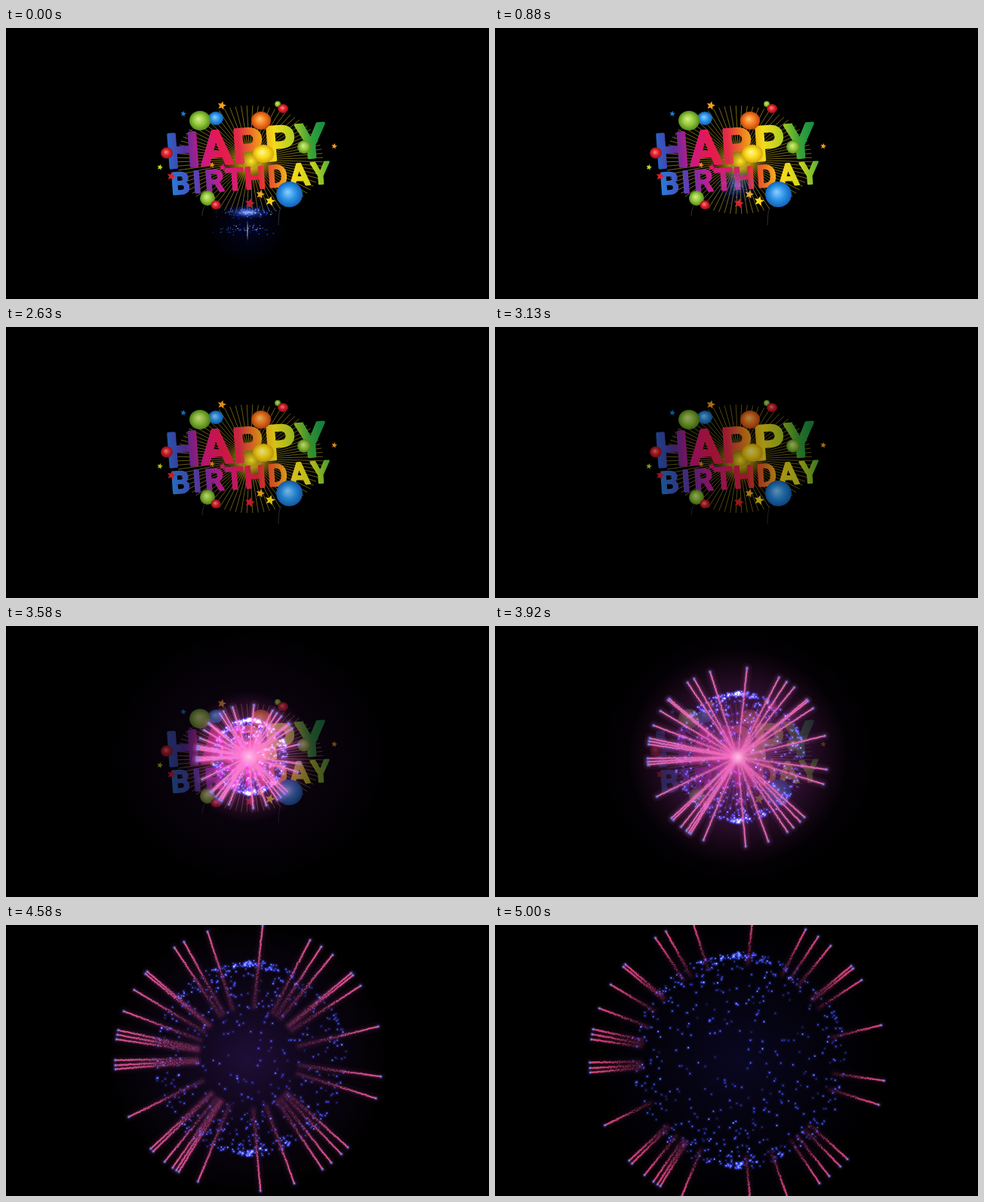
These frames come from a looping animation (640x360 px, 5040 ms). An HTML page with a canvas:

```html
<!DOCTYPE html>
<html lang="en">
<head>
<meta charset="utf-8">
<title>Happy Birthday</title>
<style>
html, body { margin: 0; height: 100%; overflow: hidden; background: #000; }
canvas { display: block; }
</style>
</head>
<body>
<canvas id="stage" width="640" height="360"></canvas>
<script>
const TAU = Math.PI * 2;
const LOOP = 5040;
const FPS = 24;
const BURST = 3.27;       // seconds
const TRAIL_LIFE = 1;
const TRAIL_STEP = 0.006;

const stage = document.getElementById('stage');
const ctx = stage.getContext('2d');

const clamp = v => Math.max(0, Math.min(1, v));
const hash = n => { const v = Math.sin(n * 12.9898 + 4.1) * 43758.5453; return v - Math.floor(v); };
const spread = n => hash(n) + hash(n + 0.37) + hash(n + 0.71) - 1.5;

// --- greeting, drawn once ---

const art = document.createElement('canvas');
art.width = 640;
art.height = 360;
const pen = art.getContext('2d');

function rays() {
  pen.strokeStyle = '#94801e';
  pen.lineWidth = 0.8;
  pen.beginPath();
  for (let i = 0; i < 80; i++) {
    const a = (i + 0.5) / 80 * TAU, c = Math.cos(a), s = Math.sin(a);
    pen.moveTo(323 + c * 14, 175 + s * 11);
    pen.lineTo(323 + c * 97, 175 + s * 72);
  }
  pen.stroke();
  const g = pen.createRadialGradient(325, 177, 0, 325, 177, 34);
  g.addColorStop(0, 'rgba(255,235,40,1)');
  g.addColorStop(0.35, 'rgba(230,190,20,.7)');
  g.addColorStop(1, 'rgba(120,90,0,0)');
  pen.fillStyle = g;
  pen.fillRect(285, 137, 80, 80);
}

function word(text, xs, baseline, size, edge, colors) {
  const mid = 322;
  pen.save();
  pen.translate(mid, baseline);
  pen.rotate(-0.073);
  const g = pen.createLinearGradient(-107, 0, 107, 0);
  colors.forEach((c, i) => g.addColorStop(i / (colors.length - 1), c));
  pen.fillStyle = pen.strokeStyle = g;
  pen.lineWidth = edge;
  pen.lineJoin = 'round';
  pen.textAlign = 'center';
  pen.font = `500 ${size}px Roboto, "Open Sans", sans-serif`;
  [...text].forEach((ch, i) => {
    pen.fillText(ch, xs[i] - mid, -edge / 2);
    pen.strokeText(ch, xs[i] - mid, -edge / 2);
  });
  pen.restore();
}

function balloon(x, y, rx, ry, light, main, dark) {
  pen.save();
  pen.translate(x, y);
  pen.scale(rx, ry);
  const g = pen.createRadialGradient(-0.15, -0.2, 0, 0, 0, 1);
  g.addColorStop(0, light);
  g.addColorStop(0.55, main);
  g.addColorStop(1, dark);
  pen.fillStyle = g;
  pen.beginPath();
  pen.arc(0, 0, 1, 0, TAU);
  pen.fill();
  pen.restore();
}

function star(x, y, r, color) {
  pen.fillStyle = color;
  pen.beginPath();
  for (let i = 0; i < 10; i++) {
    const a = i * TAU / 10 - 1.35, d = i % 2 ? r * 0.45 : r;
    pen.lineTo(x + Math.cos(a) * d, y + Math.sin(a) * d);
  }
  pen.fill();
}

function strings() {
  pen.strokeStyle = '#3c3c48';
  pen.lineWidth = 0.8;
  for (const [x, y, dx, dy] of [[364, 238, -3, 24], [264, 236, -4, 14], [248, 134, -10, 14]]) {
    pen.beginPath();
    pen.moveTo(x, y);
    pen.quadraticCurveTo(x + dx, y + dy / 3, x + dx, y + dy);
    pen.stroke();
  }
}

function drawArt() {
  const green = ['#d9ee8c', '#93c83a', '#568c1e'];
  const blue = ['#8fd0ff', '#2b93e8', '#1462b4'];
  const red = ['#ff8a80', '#e0202c', '#9c0f1c'];
  const orange = ['#ffc46a', '#f47a20', '#c2480c'];
  const yellow = ['#fff9a0', '#fbdc1c', '#d8a80c'];

  rays();
  strings();
  word('HAPPY', [236, 280, 322, 365, 406], 180, 62, 4,
    ['#2667c8', '#5a2f9e', '#cf1880', '#e6194e', '#e22a48', '#f08a1c', '#f2dc1c', '#b4cf24', '#38a338', '#0f8a48']);
  word('BIRTHDAY', [232, 254, 277, 304, 331, 361, 390, 418], 215, 40, 2.5,
    ['#2484dc', '#3d5cc8', '#7030a8', '#c81c90', '#e01c60', '#e0243c', '#ee6a22', '#f6d81c', '#d0d81e', '#5cb434']);
  balloon(338, 123, 13, 12, ...orange);
  balloon(278, 120, 10, 9, ...blue);
  balloon(257, 123, 14, 13, ...green);
  balloon(360, 101, 4, 4, ...green);
  balloon(367, 107, 7, 6, ...red);
  balloon(213, 166, 8, 7.5, ...red);
  balloon(341, 167, 14, 12, ...yellow);
  balloon(395, 158, 9, 9, ...green);
  balloon(267, 226, 10, 10, ...green);
  balloon(278, 235, 6.5, 6, ...red);
  balloon(375.5, 221, 17.5, 17, ...blue);

  star(286, 103, 6, '#f6a01e');
  star(235, 114, 4, '#1c78d0');
  star(435, 157, 4, '#f09a28');
  star(204, 185, 4, '#c8d820');
  star(219, 197, 6, '#dc2030');
  star(287, 185, 5, '#e0186c');
  star(273, 182, 4, '#f08c1c');
  star(323, 233, 7, '#dc2028');
  star(337, 221, 6, '#f6b01e');
  star(350, 230, 7, '#f8dc1c');
}

// --- light effects ---

function glow(x, y, rx, ry, rgb, alpha) {
  if (alpha <= 0) return;
  ctx.save();
  ctx.translate(x, y);
  ctx.scale(rx, ry);
  const g = ctx.createRadialGradient(0, 0, 0, 0, 0, 1);
  g.addColorStop(0, `rgba(${rgb},${alpha})`);
  g.addColorStop(0.4, `rgba(${rgb},${alpha * 0.5})`);
  g.addColorStop(1, `rgba(${rgb},0)`);
  ctx.fillStyle = g;
  ctx.fillRect(-1, -1, 2, 2);
  ctx.restore();
}

function dot(x, y, size, alpha) {
  ctx.globalAlpha = alpha;
  ctx.fillRect(x - size / 2, y - size / 2, size, size);
}

function sparks(count, seed, x, y, sx, sy, alpha, frame) {
  for (let i = 0; i < count; i++) {
    const n = seed + i * 3;
    ctx.fillStyle = i % 4 ? '#3058ff' : '#a0c8ff';
    dot(x + spread(n) * sx, y + spread(n + 1) * sy, 1.4, alpha * (0.3 + 0.7 * hash(n + frame * 7)));
  }
  ctx.globalAlpha = 1;
}

function rocket(t, frame) {
  const fade = clamp(1 - t / 1.7), tail = clamp(1 - t / 0.55);
  if (!fade) return;
  const y = 245 - 42 * t, tall = 5 + 10 * clamp(t / 0.88);
  glow(320, y + 18, 55, 52, '10,15,110', 0.35 * tail);
  glow(320, y, 30, tall * 1.8, '40,80,255', 0.8 * fade);
  glow(320, y, 15, tall, '190,225,255', 0.9 * fade * fade);
  sparks(110, 5, 320, y, 32 - 10 * clamp(t), tall * 1.3, fade, frame);
  if (!tail) return;
  sparks(60, 900, 315, y + 23, 36, 7, tail * 0.9, frame);
  glow(320, y + 24, 1.5, 15, '200,190,210', tail);
}

const angles = [
  -84, -62.6, -57, -51, -39.8, -38.6, -33, -13.8, 7.9, 17.5, 42, 46, 51.7, 56.4, 70, 84.9,
  112.3, 121.5, 122.8, 124.7, 129, 135.6, 137.2, 153.9, 175.3, 177, 179.2,
  188.2, 190.2, 192.2, 200.7, 210.9, 219.4, 220.6, 236.2, 241, 252.1
].map(d => d * TAU / 360);

const reach = age => 227 * (1 - Math.exp(-1.15 * Math.max(0, age)));

function shell(age, cy, frame) {
  const r = reach(age) * 0.715;
  for (let i = 0; i < 640; i++) {
    const tilt = hash(i) * Math.PI, turn = hash(i + 0.5) * TAU;
    const d = r * (0.97 + 0.06 * hash(i + 0.2));
    const x = 323 + Math.sin(tilt) * Math.cos(turn) * d;
    const y = cy - Math.cos(tilt) * d;
    const a = 0.25 + 0.75 * hash(i * 1.7 + frame * 3.3);
    ctx.fillStyle = '#3038d8';
    dot(x, y, 6, a * 0.1);
    dot(x, y, 3.6, a * 0.25);
    ctx.fillStyle = i % 5 ? '#4458ea' : '#80a8ff';
    dot(x, y, 1.6, a);
  }
  ctx.globalAlpha = 1;
}

function streaks(age, cy) {
  const cx = 321.5, heat = clamp(1 - age / 1.8);
  const tip = reach(age), core = reach(age - TRAIL_LIFE * 0.6), tail = reach(age - TRAIL_LIFE);
  const first = Math.max(0, Math.ceil((age - TRAIL_LIFE) / TRAIL_STEP));
  const last = Math.floor(age / TRAIL_STEP);
  const color = `rgb(${205 + 55 * heat},${65 + 75 * heat},${120 + 110 * heat})`;
  const lines = [[13, 0.03 + 0.04 * heat, tail], [6, 0.08 + 0.1 * heat, tail], [2.2, 0.25 + 0.35 * heat, core]];

  ctx.lineCap = 'round';
  for (const a of angles) {
    const c = Math.cos(a), s = Math.sin(a);
    ctx.strokeStyle = color;
    for (const [width, alpha, from] of lines) {
      ctx.globalAlpha = alpha;
      ctx.lineWidth = width;
      ctx.beginPath();
      ctx.moveTo(cx + c * from, cy + s * from);
      ctx.lineTo(cx + c * tip, cy + s * tip);
      ctx.stroke();
    }
    ctx.fillStyle = color;
    for (let j = first; j <= last; j++) {
      const old = (age - j * TRAIL_STEP) / TRAIL_LIFE, n = a * 977 + j;
      const r = reach(j * TRAIL_STEP) + spread(n) * 2 * old;
      const off = spread(n + 0.13) * (0.6 + 1.3 * old);
      dot(cx + c * r - s * off, cy + s * r + c * off, 1.4, clamp(1.35 - 1.2 * old) * 0.75);
    }
    ctx.globalAlpha = 1;
    const x = cx + c * tip, y = cy + s * tip;
    glow(x, y, 3.5, 3.5, '70,110,255', 0.7);
    ctx.fillStyle = '#90b0ff';
    dot(x, y, 1.5, 0.9);
    ctx.globalAlpha = 1;
  }
}

function burst(age, frame) {
  if (age <= 0) return;
  const cy = 173.3 + 2.2 * age * age, r = reach(age);
  ctx.globalCompositeOperation = 'lighter';
  glow(322, cy, 190, 175, '70,20,95', 0.3 * clamp(age * 6) * clamp(1.9 - age));
  glow(322, cy, r * 1.15 + 8, r * 1.15 + 8, '235,75,190', 0.8 * clamp(1 - age / 1.4));
  glow(322, cy, r, r, '20,20,95', 0.3);
  shell(age, cy, frame);
  ctx.globalCompositeOperation = 'source-over';
  streaks(age, cy);
  glow(322, cy, 13, 13, '255,205,235', clamp((1.3 - age) * 2) * 0.9);
}

function draw(now) {
  const frame = Math.floor((now % LOOP + 4) * FPS / 1000);
  const t = frame / FPS;
  ctx.globalCompositeOperation = 'source-over';
  ctx.fillStyle = '#000';
  ctx.fillRect(0, 0, 640, 360);
  ctx.globalAlpha = 1 - clamp((t - 2.1) / 2.2) ** 1.5;
  ctx.drawImage(art, 0, 0);
  ctx.globalAlpha = 1;
  rocket(t, frame);
  burst(t - BURST, frame);
  requestAnimationFrame(draw);
}

drawArt();
requestAnimationFrame(draw);
</script>
</body>
</html>
```
